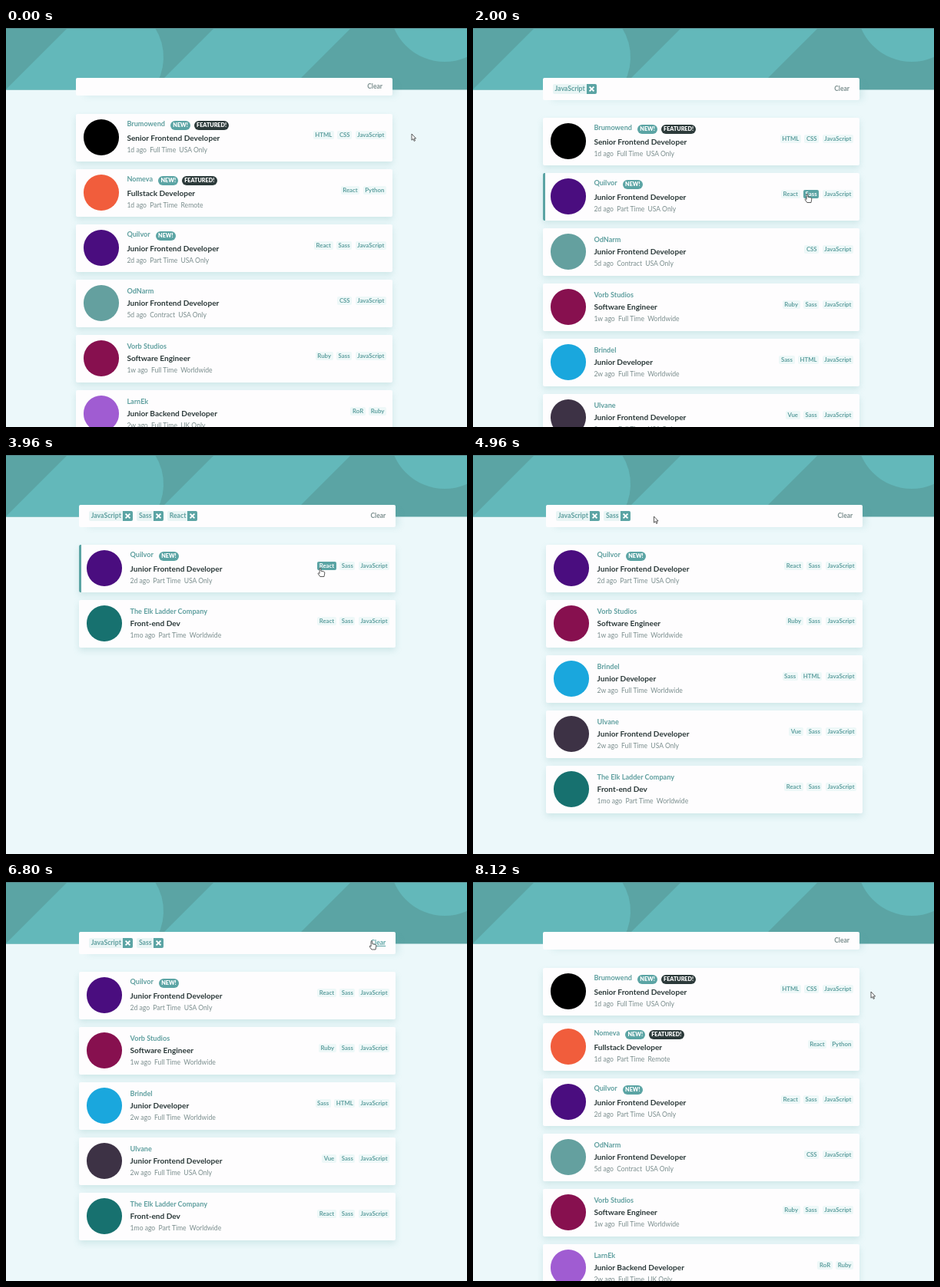
These frames come from a looping animation (600x520 px, 8.16 s). An HTML page:

```html
<!DOCTYPE html>
<html lang="en">
<head>
<meta charset="utf-8">
<title>Job listings</title>
<style>
  html, body { margin: 0; width: 100%; height: 100%; overflow: hidden; }
  body { position: relative; background: #ecf8fa; font: 700 9.1px/12px Lato, sans-serif; color: #5f9f9f; white-space: nowrap; }
  svg, .card, .bar, .disc, .company, .title, .meta, .tags, .filters, .clear { position: absolute; }
  #header { left: 0; top: 0; }
  #page { position: absolute; top: 0; width: 412px; }
  .card, .bar { width: 412px; background: #fefdfe; border-radius: 2px; box-shadow: 0 4px 9px rgba(91, 164, 164, .2); }
  .bar { top: 65.4px; height: 28.4px; box-shadow: 8px 4px 8px -4px rgba(91, 164, 164, .17); }
  .bar.empty { height: 23px; }
  .clear { right: 13px; top: calc(50% - 6.5px); font-size: 8.5px; color: #7b8e8e; }
  .clear.hot { color: #5ba4a4; text-decoration: underline; }
  .filters { left: 13px; top: 7.4px; display: flex; gap: 5.5px; }
  .filter { display: flex; height: 13px; line-height: 12.4px; font-size: 8.7px; }
  .filter span { padding: 0 2px 0 2.5px; background: #e9f5f5; border-radius: 2px 0 0 2px; }
  .filter i { width: 13px; background: #5ba4a4; border-radius: 0 2px 2px 0; }
  .filter i.hot { background: #2c3a3a; }
  .filter svg { position: static; display: block; }
  .card { height: 62px; }
  .card.hot::before { content: ""; position: absolute; left: 0; width: 2.5px; height: 100%; background: #5ba4a4; border-radius: 2px 0 0 2px; }
  .disc { left: 9.7px; top: 7.3px; width: 46.6px; height: 46.6px; border-radius: 50%; }
  .company, .title, .meta { left: 66.4px; }
  .company { top: 9px; display: flex; }
  .title { top: 24px; font-size: 10.1px; color: #2c3a3a; }
  .meta { top: 40.4px; display: flex; gap: 4.2px; font-size: 8.6px; font-weight: 400; color: #7b8e8e; }
  .badged .company { top: 7px; }
  .badged .title { top: 25.4px; }
  .badged .meta { top: 41.4px; }
  .pill { margin: 2.4px 0 0 4.5px; padding: 0 3.4px; border-radius: 6px; font-size: 7.2px; font-weight: 900; color: #fff; background: #5ba4a4; }
  .name + .pill { margin-left: 7px; }
  .dark { background: #2c3a3a; }
  .tags { right: 8px; top: 21.8px; display: flex; gap: 4.4px; font-size: 7.8px; line-height: 11px; }
  .tag { padding: 0 2.6px; background: #eef8f8; border-radius: 2px; }
  .tag.hot { background: #5ba4a4; color: #fff; }
  .cursor { left: 0; top: 0; overflow: visible; pointer-events: none; }
</style>
</head>
<body>
<svg id="header" width="600" height="81">
  <g fill="#5ba4a4">
    <rect width="600" height="80.5"/>
  </g>
  <g fill="#63b8ba">
    <path d="M80 0H134V80.5H-.5Z"/>
    <path d="M271 0H449L368.5 80.5H190.5Z"/>
    <path d="M134 0H194.1A71.5 71.5 0 0 1 191 80.5H134Z"/>
    <circle cx="571" cy="-27.5" r="71.5"/>
  </g>
  <rect width="600" height="1" fill="#56878a"/>
</svg>
<div id="page"></div>
<svg class="cursor" id="arrow" width="8" height="12">
  <path d="M0 0V8.2L1.9 6.5L3.2 9.4L4.5 8.8L3.2 6H5.6Z" fill="#fff" stroke="#333" stroke-width=".8"/>
</svg>
<svg class="cursor" id="hand" width="10" height="13">
  <path d="M-.9 .8Q0-.6 .9 .8V4.2L4.8 5Q6 5.4 5.8 7L5 11.5H-.2L-2.9 7.6Q-2.9 6-.9 7.4Z" fill="#fff" stroke="#333" stroke-width=".8"/>
</svg>
<script>
const LOOP = 8160;
const page = document.getElementById('page');
const arrow = document.getElementById('arrow');
const hand = document.getElementById('hand');

// company, disc colour, badges, title, details, tags
const jobs = [
  ['Brumowend', '#000', 2, 'Senior Frontend Developer', '1d ago|Full Time|USA Only', 'HTML CSS JavaScript'],
  ['Nomeva', '#f15d3c', 2, 'Fullstack Developer', '1d ago|Part Time|Remote', 'React Python'],
  ['Quilvor', '#4a0d7f', 1, 'Junior Frontend Developer', '2d ago|Part Time|USA Only', 'React Sass JavaScript'],
  ['OdNarm', '#64a09f', 0, 'Junior Frontend Developer', '5d ago|Contract|USA Only', 'CSS JavaScript'],
  ['Vorb Studios', '#87104f', 0, 'Software Engineer', '1w ago|Full Time|Worldwide', 'Ruby Sass JavaScript'],
  ['LarnEk', '#a05cd2', 0, 'Junior Backend Developer', '2w ago|Full Time|UK Only', 'RoR Ruby'],
  ['Brindel', '#1aa7dd', 0, 'Junior Developer', '2w ago|Full Time|Worldwide', 'Sass HTML JavaScript'],
  ['Ulvane', '#3d3245', 0, 'Junior Frontend Developer', '2w ago|Full Time|USA Only', 'Vue Sass JavaScript'],
  ['The Elk Ladder Company', '#17716f', 0, 'Front-end Dev', '1mo ago|Part Time|Worldwide', 'React Sass JavaScript'],
];

// click time, active filters
const states = [
  [0, ''], [640, 'JavaScript'], [2120, 'JavaScript Sass'], [3240, 'JavaScript Sass React'],
  [4460, 'JavaScript Sass'], [7300, ''],
];

// pointer stops: time, x, y
const stops = [
  [0, 528, 138], [100, 528, 138], [560, 476, 138], [960, 476, 138], [1700, 435, 216],
  [2300, 435, 216], [2960, 409, 147], [3960, 409, 147], [4400, 235.5, 80], [5760, 235.5, 80],
  [6560, 476, 76.5], [7400, 476, 76.5], [7940, 518, 143], [LOOP, 518, 143],
];

const words = text => text.split(' ').filter(Boolean);
const spans = (list, cls) => list.map(s => `<span class="${cls}">${s}</span>`).join('');

function card([company, colour, badges, title, details, tags], top) {
  const pills = ['<span class="pill">NEW!</span>', '<span class="pill dark">FEATURED!</span>'];
  return `<div class="card ${badges ? 'badged' : ''}" style="top:${top}px">
    <div class="disc" style="background:${colour}"></div>
    <div class="company"><span class="name">${company}</span>${pills.slice(0, badges).join('')}</div>
    <div class="title">${title}</div>
    <div class="meta">${spans(details.split('|'), '')}</div>
    <div class="tags">${spans(words(tags), 'tag')}</div>
  </div>`;
}

function render(active) {
  const filters = words(active);
  const shown = jobs.filter(job => filters.every(f => words(job[5]).includes(f)));
  const first = filters.length ? 117 : 112;
  const cross = '<i><svg width="13" height="13"><path d="M3.6 3.6l5.8 5.8m0-5.8l-5.8 5.8" stroke="#fff" stroke-width="2"/></svg></i>';
  // a short list needs no scrollbar, so the column recentres
  page.style.left = (shown.length > 5 ? 91 : 95.2) + 'px';
  page.innerHTML = `<div class="bar ${filters.length ? '' : 'empty'}">
    <div class="filters">${filters.map(f => `<div class="filter"><span>${f}</span>${cross}</div>`).join('')}</div>
    <div class="clear">Clear</div></div>` + shown.map((job, i) => card(job, first + 72 * i)).join('');
}

function pointerAt(t) {
  const i = stops.findIndex(s => s[0] > t);
  const [t0, x0, y0] = stops[i - 1], [t1, x1, y1] = stops[i];
  const p = (t - t0) / (t1 - t0), e = p * p * (3 - 2 * p);
  return [x0 + (x1 - x0) * e, y0 + (y1 - y0) * e];
}

function hover(x, y) {
  page.querySelectorAll('.hot').forEach(el => el.classList.remove('hot'));
  const under = document.elementFromPoint(x, y);
  const target = under && under.closest('.tag, .clear, .filter i');
  const hovered = under && under.closest('.card');
  if (target) target.classList.add('hot');
  if (hovered) hovered.classList.add('hot');
  return Boolean(target);
}

let current = null;
function frame(now) {
  const t = now % LOOP;
  const active = states.filter(s => s[0] <= t).pop()[1];
  if (active !== current) render(current = active);
  const [x, y] = pointerAt(t);
  const pointing = hover(x, y);
  arrow.style.display = pointing ? 'none' : '';
  hand.style.display = pointing ? '' : 'none';
  arrow.style.transform = hand.style.transform = `translate(${x}px, ${y}px)`;
  requestAnimationFrame(frame);
}
frame(0);
</script>
</body>
</html>
```
